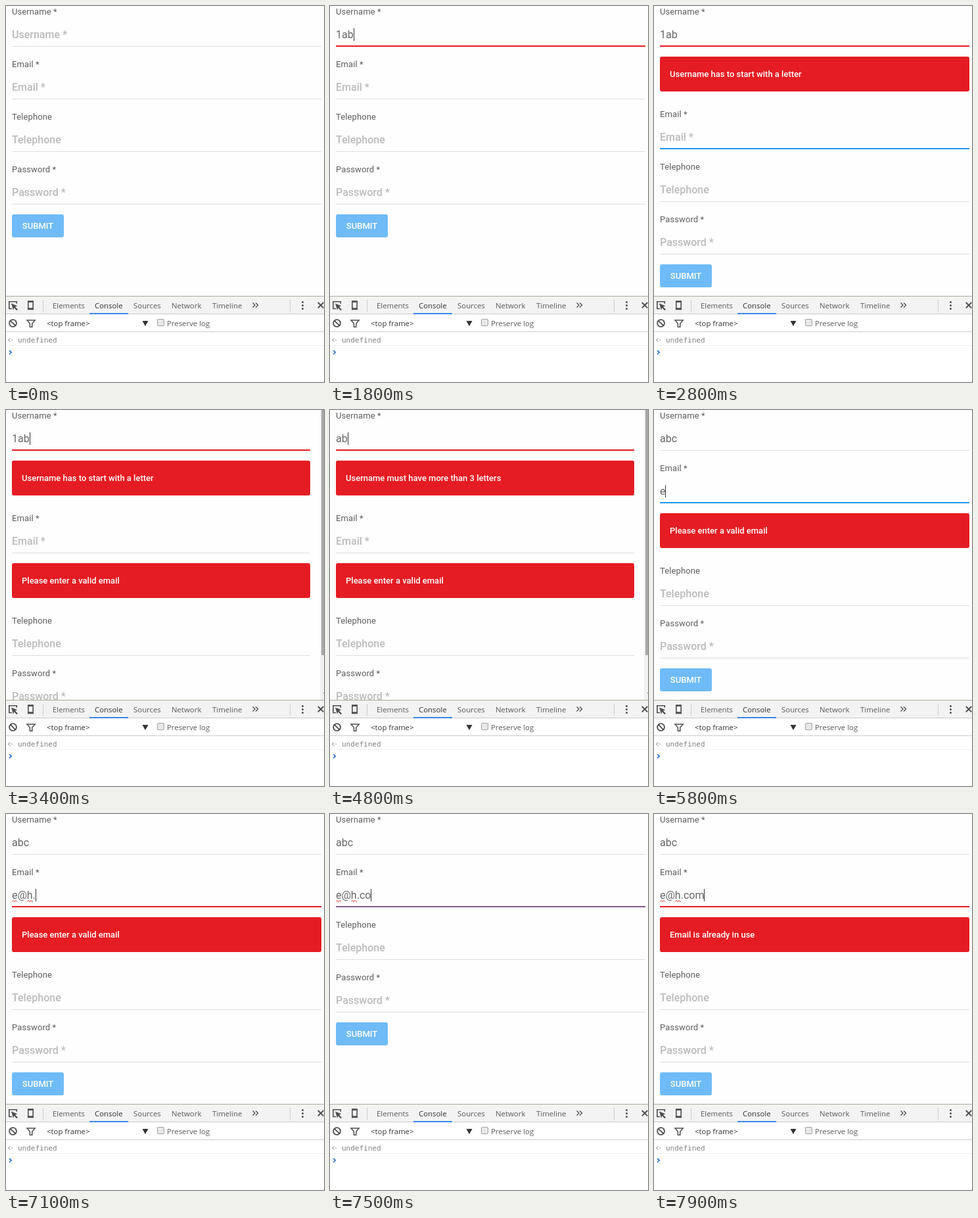
These frames come from a looping animation (484x572 px, 8 s). An HTML page:

```html
<!DOCTYPE html>
<html lang="en">
<head>
<meta charset="utf-8">
<title>Form validation</title>
<style>
html, body { margin: 0; width: 100%; height: 100%; overflow: hidden; background: #fff; }
#stage { position: relative; width: 484px; height: 572px; overflow: hidden; background: #fefefe; }
#form { position: absolute; inset: 0 0 auto; height: 441px; overflow: hidden; font: 13px Roboto, sans-serif; color: #666; }
.group, .group > *, #submit, #bar, #bar i { position: absolute; }
.group { left: 9px; width: 471px; height: 80px; }
.narrow .group { width: 454px; }
.label { top: 0; line-height: 17px; letter-spacing: .1px; color: #5c5c5c; white-space: pre; }
.value, .hint { top: 34px; height: 19px; line-height: 19px; font-size: 16px; white-space: pre; }
.group > .value, .group > .hint { top: 34px; }
.value span { position: relative; }
.value svg { position: absolute; left: 0; bottom: -1px; width: 100%; height: 3px; overflow: hidden; }
.hint { color: #bbb; font-weight: 500; }
.caret { position: absolute; left: 100%; top: 0; width: 1px; height: 19px; background: #333; }
.row { left: 0; right: 0; height: 1px; }
.error { top: 77px; left: 0; right: 0; height: 53px; line-height: 53px; padding-left: 15px; box-sizing: border-box; border-radius: 3px; background: #e51c23; color: #fff; font-weight: 500; }
#submit { left: 9px; width: 79px; height: 35px; line-height: 35px; text-align: center; border-radius: 3px; background: #6fbbf7; color: #fff; font-weight: 500; }
#bar { left: 478px; top: 0; width: 6px; height: 441px; background: #f1f1f1; }
#bar i { left: 2px; top: 0; width: 4px; height: 373px; background: #a8a8a8; }
#bar i + i { left: 5px; top: 430px; width: 1px; height: 1px; background: #505050; }
#tools { position: absolute; left: 0; top: 441px; }
#tools text { font: 11.4px "Open Sans", sans-serif; fill: #5a5a5a; }
#tools .mono { font: 11px "DejaVu Sans Mono", monospace; fill: #808080; }
</style>
</head>
<body>
<div id="stage">
  <div id="form">
    <div id="submit">SUBMIT</div>
    <div id="bar"><i></i><i></i></div>
  </div>
  <svg id="tools" width="484" height="131" viewBox="0 441 484 131">
    <path fill="#fff" d="M0 441h484v131H0z"/>
    <path fill="#f3f3f3" d="M0 442h484v53H0z"/>
    <path fill="#fff" d="M0 469h484v26H0z"/>
    <path fill="#a9aa9c" d="M0 441h484v1H0z"/>
    <path fill="#ccc" d="M0 468h484v1H0zM0 495h484v1H0zM56 447h1v18h-1zM432 447h1v18h-1z"/>
    <path fill="#f0f0f0" d="M0 516h484v1H0z"/>
    <path fill="#3b87e8" d="M127 467h59v2h-59z"/>
    <g id="tabs"></g>
    <g fill="none" stroke="#4f4f4f" stroke-width="1.6">
      <path d="M9 460.5H4.8v-10.7h11.4v3"/>
      <path d="M33.8 449h7.4v12.5h-7.4z"/>
      <path d="M33 450h9M33 460.3h9" stroke-width="2"/>
      <path d="M375.5 451.5l3.5 3.5-3.5 3.5M380 451.5l3.5 3.5-3.5 3.5" stroke-width="1.3"/>
      <path d="M474.8 451l8.4 8.4M483.2 451l-8.4 8.4" stroke-width="2"/>
      <circle cx="10.5" cy="482.5" r="5.4" stroke-width="1.9"/>
      <path d="M6.8 478.8l7.4 7.4" stroke-width="1.9"/>
      <path d="M32 478h12.2l-4.4 5v5.2h-3.4V483z" stroke-width="1.5"/>
    </g>
    <g fill="#4f4f4f">
      <path d="M8 452.5l9.3 3.8-3.3 1.4 4 4-1.6 1.6-4-4-1.5 3.2z"/>
      <circle cx="451.5" cy="450.5" r="1.5"/>
      <circle cx="451.5" cy="455.5" r="1.5"/>
      <circle cx="451.5" cy="460.5" r="1.5"/>
      <path fill="#333" d="M207.5 479h9l-4.5 8z"/>
    </g>
    <rect x="230.5" y="476.5" width="10" height="10" rx="1.5" fill="#e8e8e8" stroke="#a0a0a0"/>
    <path d="M6.5 505.5l-3 2.7 3 2.7M8 508.2h2" fill="none" stroke="#aaa" stroke-width="1.2"/>
    <path d="M5 523.8l3.2 3-3.2 3" fill="none" stroke="#3879d9" stroke-width="1.8"/>
    <text x="62" y="487" style="fill:#333">&lt;top frame&gt;</text>
    <text x="245" y="487">Preserve log</text>
    <text class="mono" x="18" y="512">undefined</text>
  </svg>
</div>
<script>
const LOOP = 8000;
// r, g, b and the opacity of the line's upper pixel row
const GREY = [221, 221, 221, 0], BLUE = [33, 150, 243, 1], RED = [229, 28, 35, 1];
const BAD_EMAIL = 'Please enter a valid email';

// Each step changes part of the state; a null value shows the placeholder.
const steps = [
  [0, { user: null, mail: null, caret: '', userError: '', mailError: '', marks: '', narrow: false }],
  [700, { caret: 'user' }],
  [1200, { caret: '' }],
  [1400, { user: '1', caret: 'user' }],
  [1600, { user: '1a' }],
  [1800, { user: '1ab' }],
  [2200, { caret: 'mail', userError: 'Username has to start with a letter' }],
  [2800, { caret: '' }],
  [3300, { caret: 'user', mailError: BAD_EMAIL, narrow: true }],
  [3800, { user: '1a' }],
  [4000, { user: '1' }],
  [4300, { user: '', userError: 'Username must have more than 3 letters' }],
  [4600, { user: 'a' }],
  [4800, { user: 'ab' }],
  [4900, { user: 'abc', userError: '', narrow: false }],
  [5200, { caret: 'mail' }],
  [5800, { mail: 'e' }],
  [6300, { mail: 'e@' }],
  [6400, { marks: 'e' }],
  [6800, { caret: '' }],
  [6900, { mail: 'e@h', caret: 'mail' }],
  [7100, { mail: 'e@h.', marks: 'eh' }],
  [7400, { mail: 'e@h.c', mailError: '' }],
  [7500, { mail: 'e@h.co' }],
  [7600, { mail: 'e@h.com' }],
  [7800, { mailError: 'Email is already in use' }]
];

const lines = {
  user: [[0, GREY], [800, BLUE], [1500, RED], [4900, BLUE], [5300, GREY]],
  mail: [[0, GREY], [2200, BLUE], [3300, GREY], [5300, BLUE], [5900, RED], [7500, BLUE], [7800, RED]]
};

const $ = id => document.getElementById(id);
const form = $('form');

function add(parent, cls, text = '') {
  const el = document.createElement('div');
  el.className = cls;
  el.textContent = text;
  return parent.appendChild(el);
}

const fields = [['user', 'Username *'], ['mail', 'Email *'], ['phone', 'Telephone'], ['pass', 'Password *']]
  .map(([key, title]) => {
    const box = add(form, 'group');
    add(box, 'label', title);
    const field = { key, box, hint: add(box, 'hint', title), value: add(box, 'value'),
      top: add(box, 'row'), bottom: add(box, 'row'), error: add(box, 'error') };
    field.top.style.top = '60px';
    field.bottom.style.top = '61px';
    return field;
  });

[['Elements', 71], ['Console', 135], ['Sources', 194], ['Network', 252], ['Timeline', 314]].forEach(([name, x]) => {
  $('tabs').innerHTML += `<text x="${x}" y="460"${name === 'Console' ? ' style="fill:#333"' : ''}>${name}</text>`;
});

const zigzag = 'M0 2.5' + 'l2 -2l2 2'.repeat(4);
const squiggle = `<svg><path d="${zigzag}" fill="none" stroke="#e51c23"/></svg>`;

function stateAt(t) {
  return Object.assign({}, ...steps.filter(s => s[0] <= t).map(s => s[1]));
}

// A line is half way at its change and complete 100 ms later.
function lineAt(key, t) {
  const list = lines[key];
  if (!list) return GREY;
  const past = list.filter(s => s[0] <= t);
  const [start, to] = past[past.length - 1];
  if (past.length < 2 || t - start >= 100) return to;
  return past[past.length - 2][1].map((v, i) => (v + to[i]) / 2);
}

function valueHtml(text, marks, caret) {
  const letters = [...text].map((c, i) =>
    `<span>${c}${i < 3 && marks.includes(c) ? squiggle : ''}</span>`).join('');
  return letters + (caret ? '<i class="caret"></i>' : '');
}

function draw(t) {
  const s = stateAt(t);
  let y = 0;
  for (const f of fields) {
    const text = s[f.key] ?? null;
    const error = s[f.key + 'Error'] || '';
    const [r, g, b, a] = lineAt(f.key, t);
    f.box.style.top = y + 'px';
    f.hint.hidden = text !== null;
    f.value.innerHTML = valueHtml(text || '', f.key === 'mail' ? s.marks : '', s.caret === f.key);
    f.top.style.background = `rgba(${r},${g},${b},${a})`;
    f.bottom.style.background = `rgb(${r},${g},${b})`;
    f.error.textContent = error;
    f.error.hidden = !error;
    y += error ? 156 : 80;
  }
  $('submit').style.top = y - 3 + 'px';
  form.classList.toggle('narrow', s.narrow);
  $('bar').hidden = !s.narrow;
}

const origin = performance.now();
let shown = -1;

function tick() {
  const t = Math.floor((performance.now() - origin) % LOOP / 100) * 100;
  if (t !== shown) draw(shown = t);
  requestAnimationFrame(tick);
}
tick();
</script>
</body>
</html>
```
